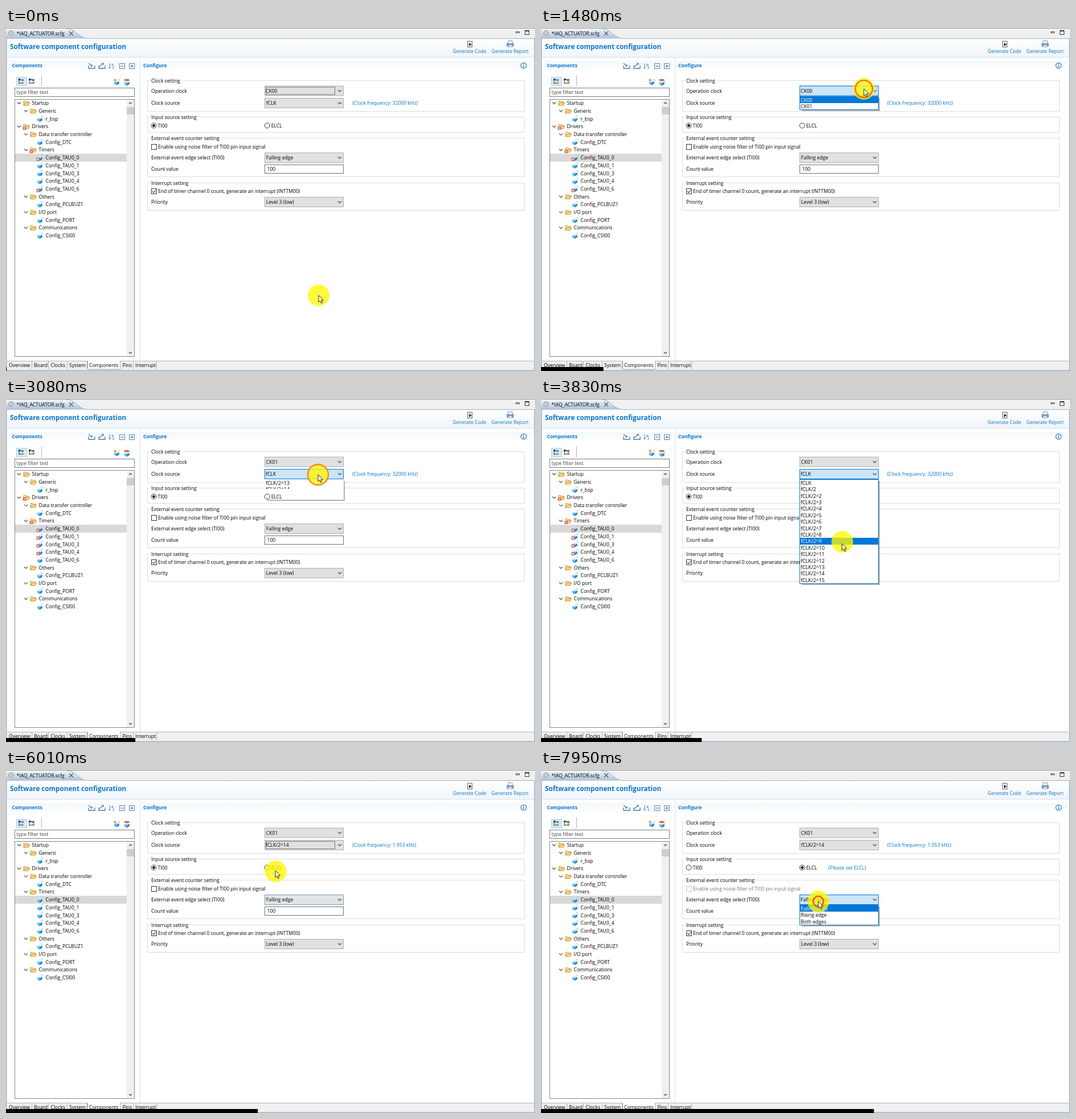
Animation of 929 by 603 pixels, one loop 8000 ms. Source, as an HTML page:

```html
<!DOCTYPE html>
<html lang="en">
<head>
<meta charset="utf-8">
<title>Software component configuration</title>
<style>
html, body { margin: 0; width: 100%; height: 100%; overflow: hidden; background: #fff; }
svg { display: block; width: 929px; height: 603px; }
text { font: 8.6px "Open Sans", "Noto Sans", sans-serif; white-space: pre; }
</style>
</head>
<body>
<svg viewBox="0 0 929 603">
  <defs>
    <linearGradient id="tab" x2="0" y2="1"><stop stop-color="#f4f7fb"/><stop offset="1" stop-color="#a9c0d9"/></linearGradient>
    <linearGradient id="head" x2="0" y2="1"><stop stop-color="#fff"/><stop offset="1" stop-color="#f0f5fa"/></linearGradient>
    <linearGradient id="section" x2="0" y2="1"><stop stop-color="#f3f8fc"/><stop offset="1" stop-color="#fff"/></linearGradient>
    <g id="folder" stroke="#c08a2c" stroke-width=".9" stroke-linejoin="round">
      <path d="M-5 4V-3.5H-1.5L-.5-2.3H3.5V0" fill="#ffe9ad"/>
      <path d="M-5 4L-2.6-.4H5.6L3.4 4Z" fill="#ffd680"/>
    </g>
    <g id="cube">
      <path d="M-5-.5L0-2.5L4-1L-.8 1Z" fill="#b5e3fb"/>
      <path d="M-5-.5L-.8 1V5.5L-4.6 3.6Z" fill="#4fb4ef"/>
      <path d="M-.8 1L4-1L3.6 3L-.8 5.5Z" fill="#1d86cf"/>
      <path d="M1-4.500H4.500V-2" fill="none" stroke="#b9c6d2"/>
    </g>
    <g id="badge"><rect x="-2.7" y="-2.7" width="5.4" height="5.4" fill="#dd4a3c"/><path d="M-1.4-1.4L1.4 1.4M1.4-1.4L-1.4 1.4" stroke="#fff" stroke-width="1.1"/></g>
  </defs>
  <g id="base"></g>
  <g id="live"></g>
</svg>
<script>
const LOOP = 8000, ROW = 11.4, BLUE = '#0a74cc', ACCENT = '#0078d7', EDGE = '#99b4d1';

const rect = (x, y, w, h, fill, stroke, extra = '') =>
  `<rect x="${x}" y="${y}" width="${w}" height="${h}" fill="${fill}"${stroke ? ` stroke="${stroke}"` : ''} ${extra}/>`;
const line = (d, stroke = '#333', width = 1, extra = '') =>
  `<path d="${d}" fill="none" stroke="${stroke}" stroke-width="${width}" ${extra}/>`;
const shape = (d, fill) => `<path d="${d}" fill="${fill}"/>`;
const label = (x, cy, s, fill = '#000', style = '') =>
  `<text x="${x}" y="${cy + 3.2}" fill="${fill}" style="${style}">${s}</text>`;
const circle = (x, y, r, fill, stroke = 'none', width = 1, extra = '') =>
  `<circle cx="${x}" cy="${y}" r="${r}" fill="${fill}" stroke="${stroke}" stroke-width="${width}" ${extra}/>`;
const use = (id, x, y) => `<use href="#${id}" x="${x}" y="${y}"/>`;
const chevron = (x, y, s = 3, up = 1) => line(`M${x - s} ${y - s / 2 * up}l${s} ${s * up}l${s} ${-s * up}`, '#444', 1.1);

// Tree: depth, caption
const tree = [
  [0, 'Startup'], [1, 'Generic'], [2, 'r_bsp'],
  [0, 'Drivers'], [1, 'Data transfer controller'], [2, 'Config_DTC'],
  [1, 'Timers'], ...[0, 1, 3, 4, 6].map(n => [2, 'Config_TAU0_' + n]),
  [1, 'Others'], [2, 'Config_PCLBUZ1'], [1, 'I/O port'], [2, 'Config_PORT'],
  [1, 'Communications'], [2, 'Config_CSI00']
];
const treeY = i => 132 + 13.7 * i;

function drawTree() {
  return tree.map(([depth, name], i) => {
    const x = 36 + 12 * depth, y = treeY(i);
    return (depth < 2 ? chevron(x - 13, y) : '') + use(depth < 2 ? 'folder' : 'cube', x, y) +
      label(x + 9.5, y, name);
  }).join('');
}

function drawToolbars() {
  const tray = (x, d) => line(`M${x - 5} 66V71H${x + 6}V66`, '#4b78a8', 1.3) + line(d, '#4b78a8', 1.2);
  const box = (x, plus) => rect(x - 4.5, 62.5, 9, 9, '#f4f9fd', '#5b87b2') +
    line(`M${x - 2.5} 67h5` + (plus ? `M${x} 64.5v5` : ''), '#2f628f');
  const nodes = x => line(`M${x - 4} 89v9M${x - 4} 91h4M${x - 4} 97h4`, '#333') +
    rect(x - 5, 89, 3, 3, '#333') + rect(x, 90, 4, 3, '#4f86b8') + rect(x, 95, 4, 3, '#c59a3a');
  return tray(150, 'M145 62l6 5m0-3v3h-3') + tray(168, 'M164 68l7-6m-3 0h3v3') +
    line('M182 62v9m-2-2l2 2l2-2', '#4b78a8') + label(185, 64, 'a', '#456', 'font-size:7px') + label(187, 69, 'z', '#456', 'font-size:7px') +
    box(204) + box(221, true) +
    rect(18.5, 86.5, 18, 15, '#d3e9fb', '#a8d3f5') + nodes(27) + nodes(45) + line('M42 89l7 3M49 89v9', '#555') +
    line('M62.5 83V102', '#b4b4b4') +
    use('cube', 195, 95) + line('M191.5 89v5m-2.5-2.5h5', '#d59b1c', 1.6) +
    use('cube', 213, 96) + rect(208, 90, 8, 3, '#e2562e');
}

function drawHeader() {
  return rect(0, 0, 929, 18, '#f0f0f0') + line('M0 .5H929', '#a0a0a0') +
    `<path d="M0 19V1H106C124 1 126 18.5 145 18.5Z" fill="url(#tab)"/>` +
    line('M106 1C124 1 126 18.5 145 18.5H929', EDGE) +
    circle(9, 9, 4.2, '#e4e4e4', '#8c8f94', 1.6, 'stroke-dasharray="2 1.3"') + circle(9, 9, 2, '#fff', '#8c8f94') +
    label(18.5, 10, '*IAQ_ACTUATOR.scfg') + line('M111 6l7 7m0-7l-7 7', '#555', 1.1) +
    rect(895.5, 6.5, 6, 2, '#fff', '#444') + rect(911.5, 4.5, 7, 7, '#fff', '#333') + line('M911 5.5h8', '#333') +
    rect(2, 19, 926, 32, 'url(#head)') + line('M2 51.5H928', '#d3e0ec') +
    label(7, 33.5, 'Software component configuration', BLUE, 'font-size:11.7px;font-weight:700') +
    rect(810.5, 23.5, 8, 10, '#f7f7f7', '#666') + shape('M813 26l5 3l-5 3Z', '#333') + line('M810 23h7', '#c9a24a') +
    rect(880, 27, 11, 5, '#7da4cf', '#5478a2') + rect(882, 22.5, 7, 5, '#fff', '#7f97b2') + rect(882, 30, 7, 3, '#fff', '#7f97b2') +
    label(784.5, 41, 'Generate Code', BLUE, 'font-size:8.45px') + label(852.5, 41, 'Generate Report', BLUE, 'font-size:8.45px');
}

function drawFooter() {
  const tabs = [['Overview', 5, 46], ['Board', 49, 75], ['Clocks', 78.5, 108], ['System', 111, 143],
    ['Components', 146, 201], ['Pins', 204.5, 224], ['Interrupt', 227, 265]];
  return rect(2, 585, 925, 17, '#f0f0f0') + line('M2 585.5H927', '#b5b5b5') +
    rect(143, 585, 58, 15, '#fff') + line('M143.5 585v13l2 2h53l2-2v-13', '#a0a0a0') +
    tabs.map(([s, x, edge]) => label(x, 593, s) + line(`M${edge - .5} 586V600`, '#b0b0b0')).join('');
}

function drawForm() {
  const group = (name, y, bottom, width) => rect(248.5, y + .5, 662, bottom - y, 'none', '#dcdcdc') +
    rect(253, y - 2, width, 5, '#fff') + label(255, y + .4, name);
  return group('Clock setting', 92, 146, 57) + group('Input source setting', 156, 183, 85) +
    group('External event counter setting', 193, 261, 124) + group('Interrupt setting', 272, 320, 70) +
    label(255, 111, 'Operation clock') + label(255, 132, 'Clock source') +
    label(255, 228, 'External event edge select (TI00)') + label(255, 248, 'Count value') +
    rect(454.5, 240.5, 138, 15, '#fff', '#707070') + label(458.5, 248, '100') +
    rect(255.5, 282.5, 9, 9, '#fff', '#333') + line('M257 287l2.3 2.5l4-5', '#222', 1.1) +
    label(267, 287, 'End of timer channel 0 count, generate an interrupt (INTTM00)') + label(255, 306, 'Priority');
}

document.getElementById('base').innerHTML =
  rect(0, 0, 929, 603, '#fff') + drawHeader() +
  rect(5, 58, 226, 18, 'url(#section)') + rect(237, 58, 688, 18, 'url(#section)') +
  label(10.5, 66, 'Components', BLUE, 'font-size:8.45px;font-weight:700') +
  label(241, 66, 'Configure', BLUE, 'font-size:8.5px;font-weight:700') +
  circle(909, 66, 4.8, '#fff', '#1769b0', 1.1) + line('M909 65v4M909 62.5v1.4', '#1769b0', 1.4) +
  line('M235.5 52V585', '#d6e3f0') +
  drawToolbars() +
  rect(15.5, 105.5, 210, 15, '#fff', '#7a7a7a') + label(18.5, 113, 'type filter text', '#444') +
  rect(15.5, 125.5, 210, 452, '#fff', '#828790') + rect(212, 126, 13, 451, '#f0f0f0') + rect(212, 139, 13, 13, '#cdcdcd') +
  chevron(218.5, 132, 2.5, -1) + chevron(218.5, 571, 2.5) +
  rect(16, 221, 196, 14, '#d9d9d9') + drawTree() + drawForm() + drawFooter() +
  line('M.75 18V602.25H928.25V18', EDGE, 1.5);

// Pointer path: time, x, y
const path = [
  [0, 549, 470], [80, 549, 470], [440, 624, 340], [840, 590, 178], [1130, 567, 107], [1700, 567, 107],
  [1900, 563, 136], [2080, 563, 136], [2500, 548, 133], [3380, 548, 133], [3830, 528.5, 254],
  [4350, 507, 306], [5050, 507, 306], [5780, 483, 212], [6010, 473, 177], [6350, 461, 173],
  [7380, 461, 173], [7500, 474, 185], [7750, 487, 231], [LOOP, 487, 231]
];
const clicks = [1255, 1940, 2810, 4690, 6480, 7815];

function slope(i, axis) {
  const a = path[i - 1], b = path[i], c = path[i + 1];
  if (!a || !c || a[axis] === b[axis] || b[axis] === c[axis]) return 0;
  return (c[axis] - a[axis]) / (c[0] - a[0]);
}

function pointer(t) {
  t = Math.max(0, Math.min(LOOP - 1, t));
  const i = path.findIndex((p, n) => t < path[n + 1][0]);
  const a = path[i], b = path[i + 1], span = b[0] - a[0], u = (t - a[0]) / span;
  const h = u * u * (3 - 2 * u);
  return [1, 2].map(k => a[k] * (1 - h) + b[k] * h +
    span * u * (1 - u) * ((1 - u) * slope(i, k) - u * slope(i + 1, k)));
}

const powers = Array.from({ length: 16 }, (_, n) => 'fCLK' + (n ? '/2' + (n > 1 ? '^' + n : '') : ''));
const combos = [
  { y: 110.5, value: t => t < 1990 ? 'CK00' : 'CK01', focus: [0, 2850],
    list: ['CK00', 'CK01'], open: 1360, close: 1990 },
  { y: 132, value: t => t < 4740 ? 'fCLK' : 'fCLK/2^14', focus: [2850, 6560],
    list: powers, open: 3040, close: 4740 },
  { y: 228, value: () => 'Falling edge', focus: [7840, LOOP],
    list: ['Falling edge', 'Rising edge', 'Both edges'], open: 7880, close: LOOP },
  { y: 306, value: () => 'Level 3 (low)', focus: [LOOP, LOOP] }
];
const isOpen = (c, t) => c.list && t >= c.open && t < c.close;

function hovered(c, t) {
  if (t < 0 || combos.some(o => isOpen(o, t))) return false;
  const [x, y] = pointer(t);
  return x > 454 && x < 593 && Math.abs(y - c.y) < 9;
}

function hoverLevel(c, t) {
  for (let k = 0; k < 10; k++) if (hovered(c, t - k * 45)) return 1 - k / 10;
  return 0;
}

function drawCombo(c, t) {
  const open = isOpen(c, t), hover = hoverLevel(c, t);
  const focused = t >= c.focus[0] && t < c.focus[1];
  const frame = (fill, stroke, extra) => rect(454.5, c.y - 8.5, 138, 17, fill, stroke, extra);
  let s = frame('#e1e1e1', '#adadad');
  if (open) s += frame('#cce4f7', ACCENT);
  else if (hover) s += frame('#e5f1fb', ACCENT, `opacity="${hover}"`);
  if (focused && !open && c.y < 200 && !hovered(c, t)) s += rect(456.5, c.y - 6.5, 121, 13, 'none', '#777');
  return s + label(focused ? 456 : 456.8, c.y, c.value(t)) + chevron(586, c.y, 3);
}

function drawList(c, t) {
  if (!isOpen(c, t)) return '';
  const top = Math.round(c.y + 9), full = Math.round(c.list.length * ROW + 1.4);
  const height = Math.min(full, (t - c.open) * .875), sliding = height < full;
  const body = sliding ? Math.max(0, height - 19) : full;
  const [, py] = pointer(t);
  const active = Math.max(0, Math.min(c.list.length - 1, Math.floor((py - top - .5) / ROW)));
  const rowY = i => Math.round(top + .7 + ROW * i + height - full);
  const items = c.list.map((s, i) => {
    const y = rowY(i), on = i === active;
    return (on ? rect(454, y, 139, rowY(i + 1) - y, ACCENT) : '') +
      label(456, y + 6, s, on ? '#fff' : '#000', c.list === powers ? 'font-size:8.9px' : '');
  }).join('');
  return line(`M594 ${top + 3}V${top + height + 1}H458`, '#000', 2, 'opacity=".3"') +
    `<clipPath id="reveal">${rect(454, top, 139, body, '#fff')}</clipPath>` +
    `<g clip-path="url(#reveal)">${rect(454, top, 139, body, '#fff')}${items}</g>` +
    (sliding ? '' : rect(454.5, top + .5, 138, full - 1, 'none', ACCENT));
}

function drawOptions(t) {
  const external = t >= 6540, disabled = t >= 6600;
  const radio = (x, s, on) => circle(x, 171.5, 4.5, '#fff', '#333') + (on ? circle(x, 171.5, 2.5, '#222') : '') + label(x + 7, 171.5, s);
  return radio(259.5, 'TI00', !external) + radio(458.7, 'ELCL', external) +
    (disabled ? label(504.5, 171.5, '(Please set ELCL)', BLUE) : '') +
    rect(255.5, 204.5, 9, 9, '#fff', disabled ? '#c4c4c4' : '#333') +
    label(267, 209, 'Enable using noise filter of TI00 pin input signal', disabled ? '#777' : '#000') +
    label(608, 132, `(Clock frequency: ${t < 4760 ? '32000' : '1.953'} kHz)`, BLUE);
}

function drawBadges(t) {
  const rows = t < 2250 ? [3, 6, 7, 11] : t < 4770 ? [3, 6, 7, 8, 9, 10] : [];
  return rows.map(i => use('badge', 32.3 + 12 * tree[i][0], treeY(i) + 3)).join('');
}

function drawPointer(t) {
  const [x, y] = pointer(t), [hx, hy] = pointer(t - 16);
  const ring = clicks.map(c => (t - c) / 300).find(u => u >= 0 && u < 1);
  return circle(hx, hy, 19, '#fff800', 'none', 0, 'opacity=".77"') +
    (ring === undefined ? '' : circle(x, y, 20 * ring, 'none', '#f8401c', 2.5, `opacity="${1 - ring * ring * .5}"`)) +
    `<path transform="translate(${x} ${y})" d="M0 0V12L2.8 9.5L4.7 13.8L6.6 13L4.7 8.8H8.6Z" fill="#fff" stroke="#111" stroke-width=".9"/>`;
}

const live = document.getElementById('live');
function render(t) {
  live.innerHTML = drawBadges(t) + drawOptions(t) +
    combos.map(c => drawCombo(c, t)).join('') + combos.map(c => drawList(c, t)).join('') +
    drawPointer(t) + rect(0, 596, 1 + t * .0734, 7, '#000');
}

const start = performance.now();
function tick() {
  render((performance.now() - start) % LOOP);
  requestAnimationFrame(tick);
}
tick();
</script>
</body>
</html>
```
